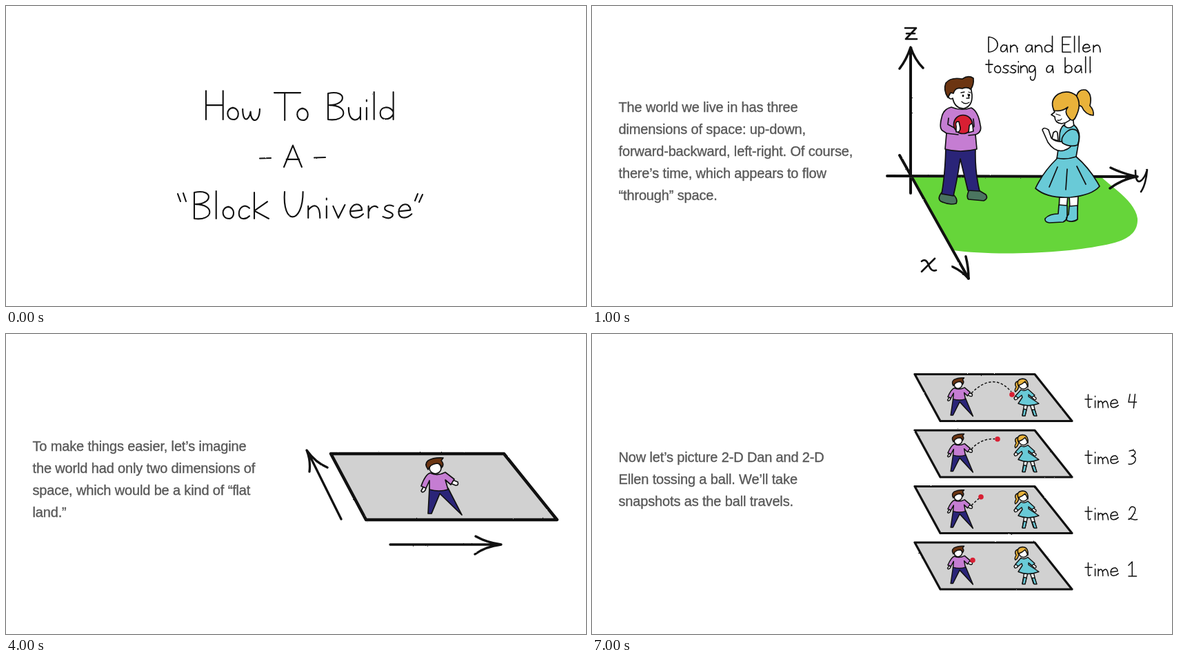
Write an HTML page that moves like this. It is 841 px wide and 436 px high and loops after 8000 ms.

```html
<!DOCTYPE html>
<html lang="en">
<head>
<meta charset="utf-8">
<title>How To Build A Block Universe</title>
<style>
html, body { margin: 0; width: 100%; height: 100%; overflow: hidden; background: #fff; }
svg { display: block; width: 841px; height: 436px; }
text { font: 20px "Liberation Sans", Arial, sans-serif; letter-spacing: -.15px; fill: #585858; stroke: #585858; stroke-width: .35px; }
.ink, .fig { stroke: #111; stroke-linecap: round; stroke-linejoin: round; }
.ink { fill: none; filter: url(#rough); }
.fig { fill: #fff; stroke-width: 1.7; }
.hand path { vector-effect: non-scaling-stroke; }
.purple { fill: #c57dd2; }
.navy { fill: #2a2478; }
.brown { fill: #6c3512; }
.blond { fill: #e9b23a; }
.cyan { fill: #69cad7; }
.shoe { fill: #4b7560; }
.red { fill: #d81f33; }
.line { fill: none; }
</style>
</head>
<body>
<svg viewBox="0 0 841 436">
<defs>
  <filter id="rough" filterUnits="userSpaceOnUse" x="0" y="0" width="841" height="436" color-interpolation-filters="sRGB">
    <feTurbulence type="fractalNoise" baseFrequency=".3" numOctaves="2" seed="4"/>
    <feDisplacementMap in="SourceGraphic" scale="1.6" xChannelSelector="R" yChannelSelector="G"/>
  </filter>
  <g id="flatBoy">
    <path d="M607 219L602 228Q604 232 608 227L610 219ZM645 211L655 215Q657 220 652 220L642 216Z"/>
    <path class="navy" d="M614 224L612 261H617L629 232L661 263L641 224Z"/>
    <path class="purple" d="M615 202Q608 204 602 221L609 224L614 213V226Q628 230 641 226L637 212L645 219L650 211L637 201Q626 207 615 202Z"/>
    <ellipse cx="622.5" cy="195" rx="8.500" ry="8"/>
    <path class="brown" d="M612 197Q606 189 612 184Q620 179 634 180L631 184Q636 189 632 194Q630 188 625 188Q615 189 612 197Z"/>
  </g>
  <g id="flatGirl">
    <path d="M627 101L624 118H628L632 102ZM635 102L640 118H644L640 101Z"/>
    <path class="cyan" d="M626 109L624 119H628L630 110ZM638 110L641 119H645L642 110Z"/>
    <path d="M617 87L612 93Q613 97 616 95L620 90ZM637 87L644 93Q644 97 641 95L635 90Z"/>
    <path class="cyan" d="M622 81L614 90L618 93L623 89L624 92L618 101Q632 107 648 101L633 91V88L638 92L642 89L632 80Q627 84 622 81Z"/>
    <path class="blond" d="M619 68Q611 70 615 77Q612 82 614 84Q620 80 619 70Z"/>
    <circle cx="625.500" cy="73.500" r="6.500"/>
    <path class="blond" d="M618 75Q615 66 624 65Q633 65 632 77Q630 72 628 69Q624 73 618 75Z"/>
  </g>
</defs>

<g class="scene">
  <g id="heading" class="ink" stroke-width="2.100">
    <path d="M368 221.500L384 221M447 220.500L463 220M249 273L253 284M257 272L261 284M597 273L593 283M604 274L599 285"/>
  </g>
</g>

<g class="scene">
  <path fill="#66d53a" d="M463 248L737 247C754 264 788 284 791 309C792 331 775 342 740 348C680 360 580 363 523 355Z"/>
  <g id="axes" class="ink" stroke-width="4">
    <path d="M462 62V272M428 247L788 248M446 217L546 396"/>
    <path stroke-width="3.500" d="M446 91Q456 78 462 60Q468 78 480 90M752 235Q770 244 791 248Q770 251 751 265M523 379Q536 385 546 396Q546 380 542 364"/>
    <path stroke-width="2.600" d="M454 32H470L455 48H471M456 40H468M788 239Q788 256 794 255Q801 252 805 238Q803 260 796 270M478 371Q484 366 488 376Q492 387 499 384M497 367L478 386"/>
  </g>
  <g id="caption" class="ink" stroke-width="1.600"></g>
  <g class="fig">
    <path class="shoe" d="M507 271Q500 280 506 284Q518 290 528 287Q531 281 524 274ZM547 267Q542 278 546 281L568 283Q575 280 571 274L561 268Z"/>
    <path class="navy" d="M513 206Q512 245 507 273L524 276Q530 250 534 222L545 268L562 269Q555 240 556 207Z"/>
    <path class="purple" d="M521 147Q509 150 507 162Q503 177 508 181Q514 185 514 185L512 208Q534 214 558 208L556 187Q566 183 563 173Q560 153 550 148Q535 153 521 147Z"/>
    <path class="line" d="M517 163L516 172L529 179M514 185L531 187M553 164L554 175L548 180M556 187L546 188"/>
    <path d="M520 117Q514 128 518 134Q521 136 523 134Q526 149 539 149Q552 146 551 129L549 116L535 110Z"/>
    <path class="brown" d="M516 133Q509 122 513 112Q520 103 537 106Q546 100 553 105Q554 115 549 121Q544 117 537 120Q527 117 524 127L520 126Z"/>
    <path class="line" stroke-width="1.300" d="M535 126L540 125M546 125L549 126M545 128L547 134L543 134M536 139Q541 144 547 140"/>
    <path stroke-width="2.600" d="M538 130v1M547 129v1"/>
    <circle class="red" cx="538" cy="172" r="13.500"/>
    <path d="M528 175Q526 167 532 168L534 177Q534 184 528 183ZM546 184L547 174Q551 168 552 174L553 182Z"/>
  </g>
  <g class="fig">
    <path d="M678 275L677 297H688L690 275ZM692 275L693 296H704L705 274Z"/>
    <path class="cyan" d="M677 289L676 302Q663 302 657 309Q656 314 663 315L683 314Q690 311 689 303V290ZM692 291L691 303Q686 308 689 312Q698 315 704 310L704 290Z"/>
    <path class="blond" d="M702 134Q704 120 716 122Q726 128 722 145Q728 151 727 159Q715 158 710 146Q704 145 702 134Z"/>
    <path d="M686 165L685 178Q693 182 699 176L697 160Z"/>
    <path d="M672 142Q667 150 671 154L666 158L671 161Q671 170 681 171Q694 169 699 157L696 136Z"/>
    <path class="blond" d="M670 152Q663 137 676 128Q690 121 702 130Q711 143 701 162Q697 170 691 162Q684 154 690 147Q681 154 670 152Z"/>
    <path class="line" stroke-width="1.300" d="M673 157L679 159M675 166Q679 167 681 164"/>
    <path class="cyan" d="M684 173Q677 179 678 194L674 222Q655 240 643 265Q660 280 694 278Q725 275 736 262Q722 236 702 219L706 196Q709 182 699 173Q691 181 684 173Z"/>
    <path class="line" d="M674 221Q687 224 702 219M663 263L675 234M687 267L689 237M716 259L703 233"/>
    <path d="M682 197Q672 198 666 192L662 180Q655 175 653 180L661 198Q671 213 684 210Q695 207 698 197ZM667 193L669 184Q674 180 675 185L676 196Z"/>
    <path class="cyan" d="M687 184Q679 192 682 199Q693 206 704 202Q709 189 703 181Q695 176 687 184Z"/>
  </g>
</g>

<g class="scene">
  <g class="ink" stroke-width="4.500">
    <path fill="#d1d1d1" d="M471 174L722 174L799 270L522 270Z"/>
    <path stroke-width="3.300" d="M486 269L437 170M440 200Q442 184 436 169Q449 187 466 194M557 306L716 306M681 294Q697 303 718 306Q695 309 680 320"/>
  </g>
  <use href="#flatBoy" class="fig"/>
</g>

<g class="scene" id="slices"></g>
</svg>

<script>
const GLYPHS = { // [advance, strokes]; baseline 0, lower case 10 high
  a: [9, "M8-8C3-12 0-7 0-4C0 1 6 1 8-6M8-9L9 0"],
  b: [9, "M0-20V0M0-6C3-12 9-10 9-5C9 0 3 2 0-2"],
  c: [8, "M8-8C4-12 0-8 0-4C0 1 5 1 8-2"],
  d: [10, "M10-6C7-11 0-10 0-5C0 1 7 1 10-4M10-21V0"],
  e: [10, "M0-5L9-6C9-12 1-12 0-5C0 1 6 1 10-3"],
  g: [9, "M8-7C6-12 0-9 0-4C0 1 7 0 8-7C9 2 9 9 5 10C2 10 1 7 2 5"],
  i: [2, "M1-9V0M1-15v1"],
  k: [11, "M0-20V0M10-13L0-6L11 0"],
  l: [2, "M1-21V0"],
  m: [13, "M0-9V0M0-6C3-10 6-10 6 0M6-6C9-10 12-10 13 0"],
  n: [9, "M0-9V0M0-6C4-11 9-11 9 0"],
  o: [9, "M5-9C-1-9-1 0 5 0C10 0 10-9 4-9"],
  r: [7, "M0-9V0M0-5C2-9 5-10 7-8"],
  s: [8, "M8-9C3-11 0-8 2-6C5-4 9-4 7-1C5 1 2 0 0-1"],
  t: [9, "M4-17V-2Q4 1 7-1M0-11H9"],
  u: [9, "M0-9C0 2 7 2 9-3M9-9V0"],
  v: [9, "M0-9L4 0L9-10"],
  w: [13, "M0-8C0 3 5 1 6-6C6 3 13 3 13-8"],
  A: [14, "M0 0L7-17L14 0M2-6H12"],
  B: [12, "M0-20V0M0-20C15-23 14-11 1-11C16-11 15 2 0 0"],
  D: [12, "M0-20V0M0-20C16-19 16-1 0 0"],
  E: [11, "M11-20H0V0H11M0-10H9"],
  H: [13, "M0-22V0M13-22V0M0-11H13"],
  T: [14, "M0-21H20M8-21V0"],
  U: [14, "M0-20C-2 6 14 5 14-20"],
  1: [10, "M0-15L5-20V0M0 0H11"],
  2: [11, "M1-14C3-21 11-19 9-13C8-9 3-1 0-1C4-4 6 1 12-1"],
  3: [10, "M1-18C12-22 11-12 4-11C14-11 10 2 0 0"],
  4: [11, "M2-19L0-8H11M9-19L7 0"]
};

function write(word, x, y, size, gap) {
  let pen = 0;
  const strokes = [...word].map(c => {
    const [advance, d] = GLYPHS[c];
    const path = `<path transform="translate(${pen})" d="${d}"/>`;
    pen += advance + gap;
    return path;
  }).join("");
  return `<g class="hand" role="img" aria-label="${word}" transform="translate(${x} ${y}) scale(${size})">${strokes}</g>`;
}

const $ = id => document.getElementById(id);
const add = (node, markup) => node.insertAdjacentHTML("beforeend", markup);
const scenes = [...document.querySelectorAll(".scene")];

add($("heading"), [
  ["How", 290, 165, 3], ["To", 389, 166, 3], ["Build", 467, 165, 3.7],
  ["Block", 273, 309, 3.7], ["Universe", 404, 308, 4]
].map(([word, x, y, gap]) => write(word, x, y, 1.9, gap)).join("") + write("A", 403, 234, 1.85, 0));

add($("caption"), [
  ["Dan", 575, 67, 4], ["and", 629, 67, 3.5], ["Ellen", 682, 67, 4],
  ["tossing", 571, 97, 2], ["a", 659, 97, 0], ["ball", 686, 97, 4]
].map(([word, x, y, gap]) => write(word, x, y, 1.1, gap)).join(""));

// Snapshots from top (latest) to bottom: ball position and trail
[
  [609, 88, "M550 86Q582 54 608 84"],
  [588, 71.3, "M550 86Q564 70 584 71"],
  [564, 73.7, "M550 86L561 76"],
  [552, 84.2, ""]
].forEach(([x, y, trail], i) => {
  const top = i * 81.5;
  add($("slices"), `
    <g class="ink" stroke-width="3.200"><path fill="#d1d1d1" d="M468 ${58.5 + top}H642L696 ${126.5 + top}H505Z"/></g>
    <g class="fig" transform="translate(0 ${top})">
      <use href="#flatBoy" transform="matrix(.66 0 -.06 .67 131.900 -56.800)" stroke-width="2.200"/>
      <use href="#flatGirl" stroke-width="1.400"/>
      <path class="line" stroke-width="1.500" stroke-linecap="butt" stroke-dasharray="3.500 2.500" d="${trail}"/>
      <circle class="red" stroke="none" cx="${x}" cy="${y}" r="3.800"/>
    </g>
    <g class="ink" stroke-width="1.500">
      ${write("time", 715, 107 + top, 1.12, 3)}${write(String(4 - i), 778, 107.5 + top, 1.05, 0)}
    </g>`);
});

const prose = (scene, y, lines) => add(scenes[scene],
  lines.map((line, i) => `<text x="38.500" y="${y + i * 32}">${line}</text>`).join(""));
prose(1, 154, ["The world we live in has three", "dimensions of space: up-down,",
  "forward-backward, left-right. Of course,", "there’s time, which appears to flow", "“through” space."]);
prose(2, 170, ["To make things easier, let’s imagine", "the world had only two dimensions of",
  "space, which would be a kind of “flat", "land.”"]);
prose(3, 186, ["Now let’s picture 2-D Dan and 2-D", "Ellen tossing a ball. We’ll take",
  "snapshots as the ball travels."]);

const ENDS = [1000, 4000, 7000, 8000];
const start = performance.now();
function tick() {
  const t = (performance.now() - start) % 8000;
  const current = ENDS.findIndex(end => t < end);
  scenes.forEach((scene, i) => scene.style.display = i === current ? "" : "none");
  requestAnimationFrame(tick);
}
tick();
</script>
</body>
</html>
```
